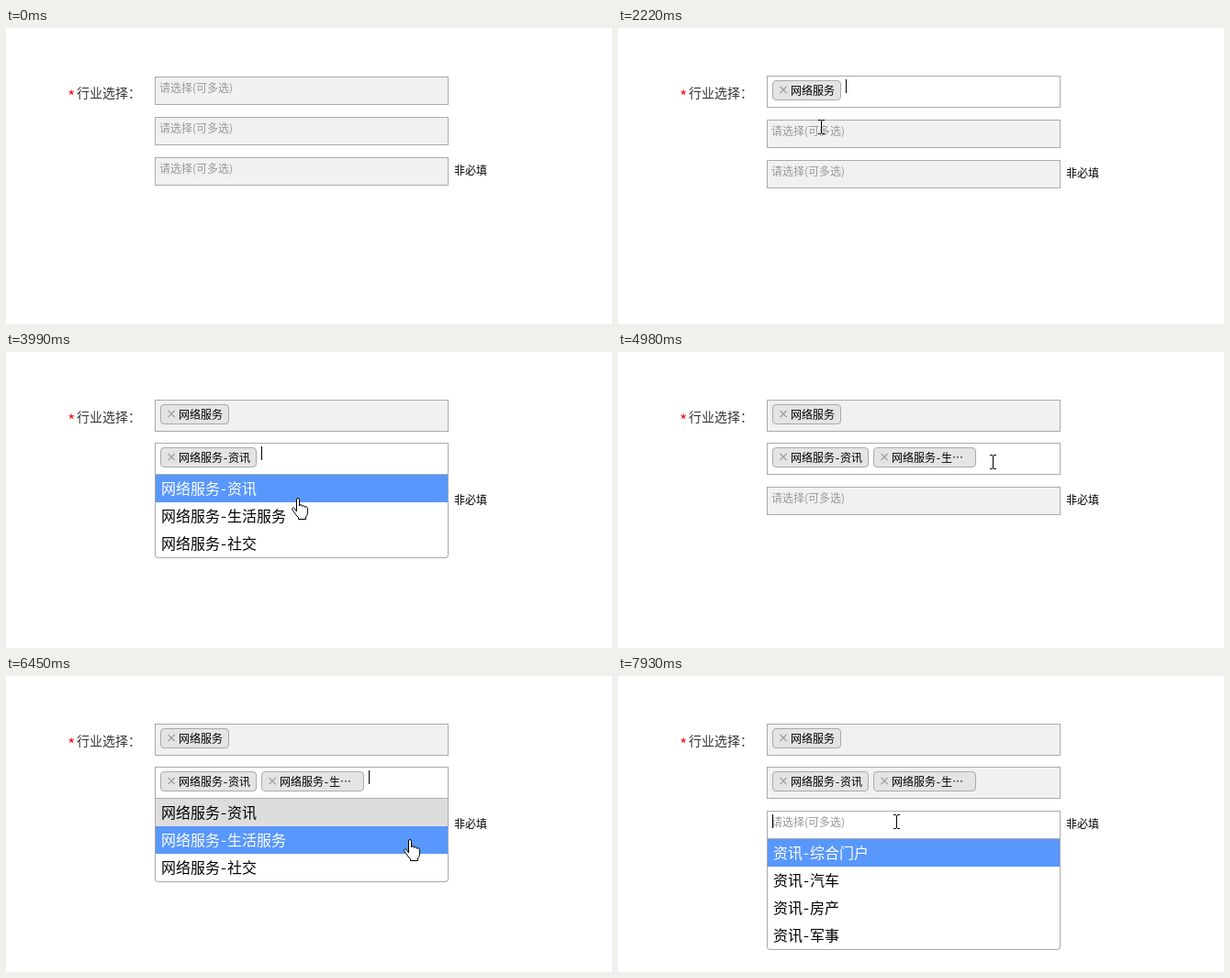
An HTML page for the animation above (8000 ms loop, 660x323 px).

```html
<!DOCTYPE html>
<html lang="zh-CN">
<head>
<meta charset="utf-8">
<title>行业选择</title>
<style>
html, body { margin: 0; width: 100%; height: 100%; overflow: hidden; background: #fff; }
body { position: relative; font: 12px/24px "Noto Sans Mono CJK SC", "Noto Sans CJK SC", "Noto Sans CJK", sans-serif; color: #000; }
body * { box-sizing: border-box; }
div, svg { position: absolute; white-space: nowrap; }
.label { left: 77px; top: 60px; font-size: 14px; line-height: 20px; color: #333; }
.star { left: 67px; top: 64px; font-size: 17px; line-height: 20px; color: #f00; }
.note { left: 488px; }
.field { left: 162px; width: 320px; border: 1px solid #aaa; background: #f1f1f1; }
.field.focus { background: #fff; }
.hint { left: 4px; top: -1px; color: #999; font-family: "Noto Sans CJK SC", "Noto Sans CJK", sans-serif; }
.tags { left: 5px; top: 4px; display: flex; gap: 5px; }
.tag { position: relative; height: 22px; padding: 0 6px 0 19px; border: 1px solid #aaa; border-radius: 4px; background: #e4e4e4; line-height: 20px; }
.tag span { display: block; max-width: 85px; overflow: hidden; text-overflow: ellipsis; }
.tag i { position: absolute; left: 4px; width: 14px; text-align: center; font: 14px/19px "DejaVu Sans", sans-serif; color: #999; }
.caret { z-index: 1; width: 1px; height: 15px; background: #000; }
.menu { z-index: 1; left: 162px; width: 320px; border: 1px solid #aaa; border-top: 0; border-radius: 0 0 4px 4px; background: #fff; overflow: hidden; }
.row { position: static; height: 30px; padding-left: 6px; font-size: 16px; line-height: 29px; }
.row.on { background: #ddd; }
.row.hot { background: #5897fb; color: #fff; }
svg { z-index: 2; left: 0; top: 0; overflow: visible; }
</style>
</head>
<body>
<div class="star">*</div>
<div class="label">行业选择：</div>
<div class="note">非必填</div>
<script>
const LOOP = 8000, TICK = 77, BLINK = 530;
const LEFT = 162, RIGHT = 482, ROW = 30;

const options = [
  ['网络服务', '电子商务', '企业服务'],
  ['网络服务-资讯', '网络服务-生活服务', '网络服务-社交'],
  ['资讯-综合门户', '资讯-汽车', '资讯-房产', '资讯-军事']
];

const open = { open: true, hot: 0 };
const pick = (...picked) => ({ open: false, picked });

// Each scene moves the pointer and may change the form as it begins or ends
const scenes = [
  { from: 70, to: 470, goal: [238, 59] },
  { from: 930, to: 990, before: { focus: 0 }, after: open },
  { from: 1300, to: 1840, goal: [225, 101], after: pick(1, 0, 0) },
  { from: 1990, to: 2220, goal: [221, 108] },
  { from: 2373, to: 2450, before: { focus: 1 }, after: open },
  { from: 2620, to: 2840, goal: [228, 148] },
  { from: 3150, to: 3690, goal: [317, 121], before: pick(1, 1, 0), after: open },
  { from: 3690, to: 3990, goal: [317, 159] },
  { from: 3990, to: 4370, goal: [328, 181], after: pick(1, 2, 0) },
  { from: 4370, to: 4985, goal: [408, 120] },
  { from: 5300, to: 5990, goal: [440, 205], before: open },
  { from: 6160, to: 6390, goal: [439, 178], after: { hot: 1 } },
  { from: 6475, to: 6930, goal: [526, 208] },
  { from: 7150, to: 7850, goal: [303, 159], before: { focus: -1, open: false } },
  { from: 7850, to: 7930, before: { focus: 2 }, after: open }
];

function add(parent, cls, text = '') {
  const el = document.createElement('div');
  el.className = cls;
  el.textContent = text;
  parent.append(el);
  return el;
}
const show = (el, on) => { el.style.display = on ? '' : 'none'; };

const fields = options.map(names => {
  const box = add(document.body, 'field');
  const hint = add(box, 'hint', '请选择(可多选)');
  const tags = add(box, 'tags');
  const chips = names.map(name => {
    const chip = add(tags, 'tag');
    chip.innerHTML = `<i>×</i><span>${name}</span>`;
    return chip;
  });
  const menu = add(document.body, 'menu');
  return { box, hint, tags, chips, menu, rows: names.map(name => add(menu, 'row', name)) };
});
const note = document.querySelector('.note');
const caret = add(document.body, 'caret');

document.body.insertAdjacentHTML('beforeend', `
<svg width="1" height="1" stroke="#000" fill="#fff" stroke-linejoin="round">
  <path id="arrow" d="M.5 .5V16.5L4.2 13L6.8 19L9.2 18L6.7 12.2H11.8Z"/>
  <path id="beam" fill="none" d="M-3 -7.5H0M1 -7.5H4M.5 -7V7M-3 7.5H0M1 7.5H4"/>
  <path id="hand" d="M-.5 15V2Q-.5 .5 1 .5T2.5 2V9Q2.7 7.5 4.2 7.7T5.6 9.5Q6 8.3 7.3 8.6T8.6 10.4Q9.2 9.6 10.3 10T11.4 12V17Q11.2 19.5 9.5 21V23.5H1.5V21.5Q-1.5 19 -3.2 15.8L-5.2 13Q-5.8 11.5 -4.5 11T-2.3 12.3Z"/>
</svg>`);
const svg = document.querySelector('svg');
const pointers = ['arrow', 'beam', 'hand'].map(id => document.getElementById(id));

const ease = k => k - Math.sin(2 * Math.PI * k) / 12;

// Play the scenes up to the given time, in even ticks
function stateAt(time) {
  const s = { focus: -1, open: false, picked: [0, 0, 0], hot: 0, since: 0, now: 0, x: 322, y: 230 };
  const apply = (change, t) => change && Object.assign(s, change, { since: t });
  for (const { from, to, goal, before, after } of scenes) {
    if (time < from) break;
    const count = Math.round((to - from) / TICK);
    const k = Math.min(1, Math.floor((time - from + 8) / (to - from) * count) / count);
    s.now = from + (to - from) * k;
    apply(before, from);
    if (goal) {
      s.x = Math.round(s.x + (goal[0] - s.x) * ease(k));
      s.y = Math.round(s.y + (goal[1] - s.y) * ease(k));
    }
    if (k === 1) apply(after, to);
  }
  return s;
}

function render(time) {
  const s = stateAt(time);
  const { focus, picked, x, y } = s;
  const [a, b] = picked;
  const tops = [a ? 52 : 53, b ? 99 : a ? 100 : 97, 141 + (a ? 3 : 0) + (b ? 3 : 0)];
  const heights = picked.map(n => n ? 35 : 31);
  const inside = x >= LEFT && x < RIGHT;

  let hot = s.hot;
  let kind = inside && tops.some((top, i) => y >= top && y < top + heights[i]) ? 1 : 0;
  if (s.open) {
    const row = Math.floor((y - tops[focus] - heights[focus]) / ROW);
    if (inside && options[focus][row]) {
      hot = row;
      kind = 2;
    }
  }

  fields.forEach((f, i) => {
    f.box.style.top = tops[i] + 'px';
    f.box.style.height = heights[i] + 'px';
    f.box.classList.toggle('focus', i === focus);
    show(f.hint, !picked[i]);
    f.chips.forEach((chip, k) => show(chip, k < picked[i]));
    show(f.menu, s.open && i === focus);
    f.menu.style.top = tops[i] + heights[i] + 'px';
    f.rows.forEach((row, k) => {
      row.classList.toggle('on', k < picked[i]);
      row.classList.toggle('hot', k === hot);
    });
  });
  note.style.top = tops[2] + 2 + 'px';

  show(caret, focus >= 0 && Math.floor((s.now - s.since) / BLINK) % 2 === 0);
  if (focus >= 0) {
    const width = fields[focus].tags.offsetWidth;
    caret.style.left = LEFT + 6 + (width && width + 5) + 'px';
    caret.style.top = tops[focus] + 4 + 'px';
  }

  show(svg, time >= scenes[0].from);
  svg.style.transform = `translate(${x}px, ${y}px)`;
  pointers.forEach((p, i) => show(p, i === kind));
}

const start = performance.now();
function frame() {
  render((performance.now() - start) % LOOP);
  requestAnimationFrame(frame);
}
frame();
</script>
</body>
</html>
```
